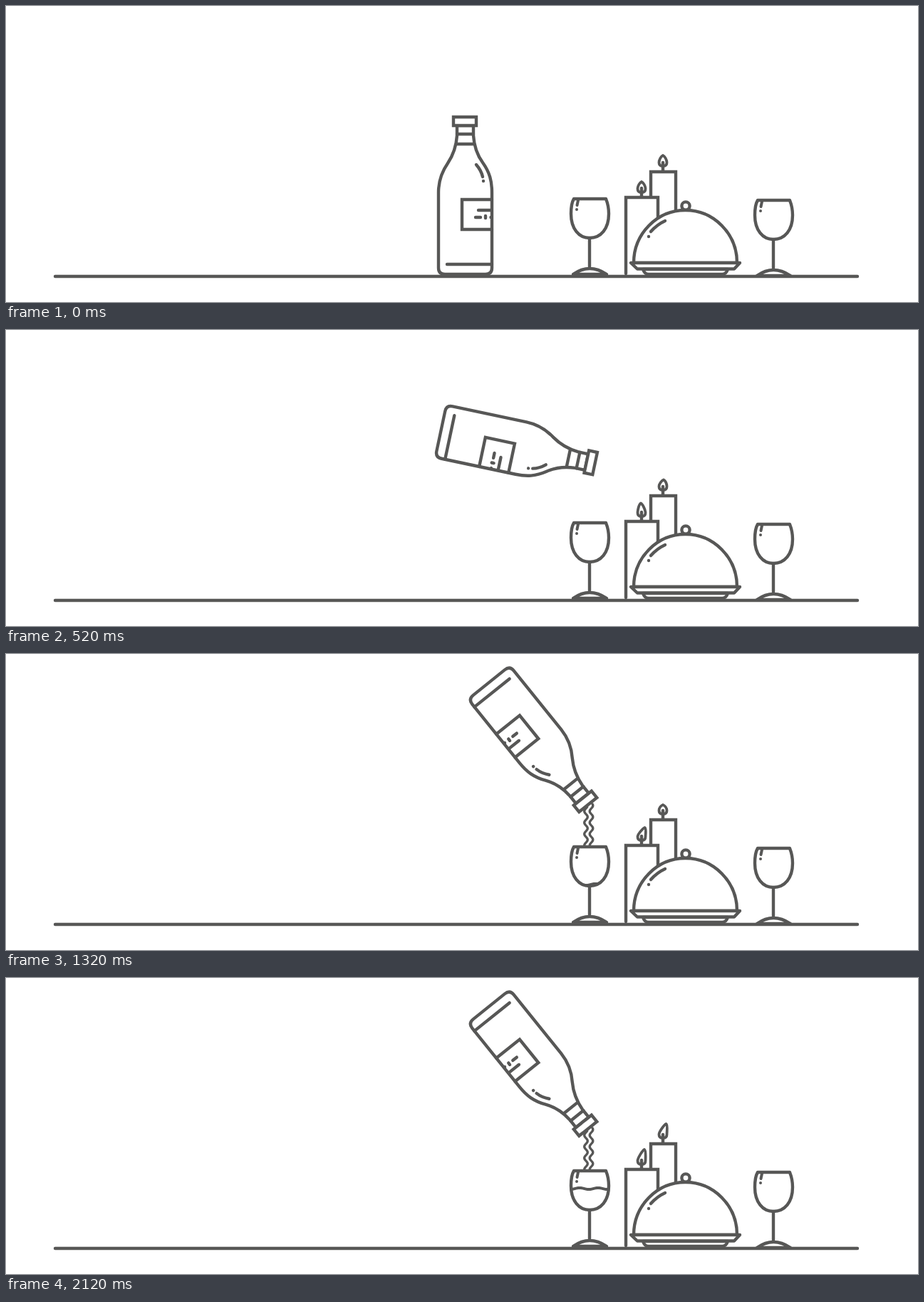
Animation, 1280 px wide and 416 px high, one loop 2.16 s. Source, as an HTML page:

```html
<!DOCTYPE html>
<html lang="en">
<head>
<meta charset="utf-8">
<title>Pouring wine</title>
<style>
  html, body { margin: 0; width: 100%; height: 100%; overflow: hidden; background: #fff; }
  svg { display: block; width: 100%; height: 100%; }
</style>
</head>
<body>
<svg viewBox="0 0 1280 416" fill="none" stroke="#575756" stroke-width="4.4" stroke-linecap="round" stroke-linejoin="round">
  <defs>
    <path id="bowl" d="M797 271H842C844 276 846 284 846 292C846 313 835 326 819 326C804 326 793 313 793 292C793 284 794 276 797 271Z"/>
    <clipPath id="inBowl"><use href="#bowl"/></clipPath>
    <path id="body" d="M633 168V182C632 197 628 209 620 221C611 234 607 246 607 262V368Q607 377 616 377H673Q682 377 682 368V262C682 246 679 234 669 220C661 209 657 197 656 182V168Z"/>
    <clipPath id="inBody"><use href="#body"/></clipPath>
    <g id="glassParts">
      <path d="M819 326V369M796 377Q819 361 843 377Z"/>
      <path d="M803 273L801.5 280M801 286h.01" stroke-width="4"/>
    </g>
  </defs>

  <path d="M69 380H1195"/>

  <!-- candles -->
  <path d="M905 269V233H940V290M870 376V269H915V300M922 220V232M892 256V268" stroke-linejoin="miter"/>
  <path id="leftFlame" stroke-width="3.8"/>
  <path id="rightFlame" stroke-width="3.8"/>

  <!-- covered dish -->
  <g fill="#fff">
    <circle cx="954" cy="281" r="5.6"/>
    <path d="M881 361A72.5 74 0 0 1 1026 361Z"/>
    <path d="M877 361H1030L1022 369.5H886Z"/>
    <path d="M894 370Q896 377 902 377H1005Q1011 377 1013 370Z"/>
    <path d="M905 317Q914 307 925 302M902 324h.01" fill="none"/>
  </g>

  <path id="stream" stroke-width="3.4"/>

  <!-- glasses -->
  <use href="#bowl" fill="#fff"/>
  <path id="liquid" clip-path="url(#inBowl)" stroke-width="4"/>
  <use href="#glassParts"/>
  <g transform="translate(258 2)"><use href="#bowl"/><use href="#glassParts"/></g>

  <g id="bottle">
    <use href="#body" fill="#fff"/>
    <path d="M628 156H660V168H628Z" fill="#fff" stroke-linejoin="miter"/>
    <path d="M633 180H656M633 194H656M619 363H682"/>
    <path d="M660 223Q667 231 669 240M670 246h.01"/>
    <path d="M682 272H640V314H682" stroke-linejoin="miter"/>
    <path d="M663 287H682M659 297H666M673 295V298M680.5 297H688" clip-path="url(#inBody)"/>
  </g>
</svg>
<script>
const LOOP = 2160, STEP = 40, TILT_END = 720;
const byId = id => document.getElementById(id);

// Flame tips: [time, sideways lean, height]
const leftTips = [[0, 0, 15], [200, 0, 18], [360, -.5, 18], [680, -1.5, 19], [1320, 4.5, 18], [1720, 2, 18], [2120, 4, 21]];
const rightTips = [[0, 0, 15], [200, -2, 14], [360, -2, 15], [680, 4, 14], [1320, 0, 13], [1720, 4, 15], [2120, 4.5, 20]];

function tipAt(keys, t) {
  const next = Math.max(1, keys.findIndex(key => key[0] >= t));
  const a = keys[next - 1], b = keys[next];
  const k = (t - a[0]) / (b[0] - a[0]);
  return [a[1] + (b[1] - a[1]) * k, a[2] + (b[2] - a[2]) * k];
}

function flame(x, y, [lean, height]) {
  const tx = x + lean, ty = y - height;
  return `M${tx} ${ty}C${tx + 2.5} ${ty + 1} ${x + 5.5} ${y - 9} ${x + 5.5} ${y - 5}` +
    `C${x + 5.5} ${y - 1.5} ${x + 3} ${y} ${x} ${y}S${x - 5.5} ${y - 1.5} ${x - 5.5} ${y - 5}` +
    `C${x - 5.5} ${y - 9} ${tx - 2.5} ${ty + 1} ${tx} ${ty}Z`;
}

function polyline(from, to, point) {
  let d = '';
  for (let v = from; v <= to; v++) d += (d ? 'L' : 'M') + point(v);
  return d;
}

function draw(t) {
  const p = Math.min(1, t / TILT_END);
  byId('bottle').setAttribute('transform',
    `translate(${103 * p} ${-139.5 * p}) rotate(${141.2 * p} 644.5 266)`);

  byId('leftFlame').setAttribute('d', flame(892, 262, tipAt(leftTips, t)));
  byId('rightFlame').setAttribute('d', flame(922, 225, tipAt(rightTips, t)));

  const speed = .14, wavelength = 16;
  const front = Math.min(270, 211 + speed * (t - TILT_END));
  const sway = y => -2.3 * Math.cos(2 * Math.PI * (y - 269 - speed * (t - 1320)) / wavelength);
  const strand = (x, top) => polyline(top, front, y => `${x + sway(y)} ${y}`);
  byId('stream').setAttribute('d', t > TILT_END ? strand(814, 215) + strand(821.5, 211) : '');

  const level = 324 - .035 * (t - 1320);
  const ripple = x => 1.1 * Math.cos(2 * Math.PI * (x - 803 - .07 * (t - 1720)) / 26);
  byId('liquid').setAttribute('d', t > 1080 ? polyline(790, 849, x => `${x} ${level - ripple(x)}`) : '');
}

function tick(now) {
  draw(Math.floor(now % LOOP / STEP) * STEP);
  requestAnimationFrame(tick);
}
draw(0);
requestAnimationFrame(tick);
</script>
</body>
</html>
```
